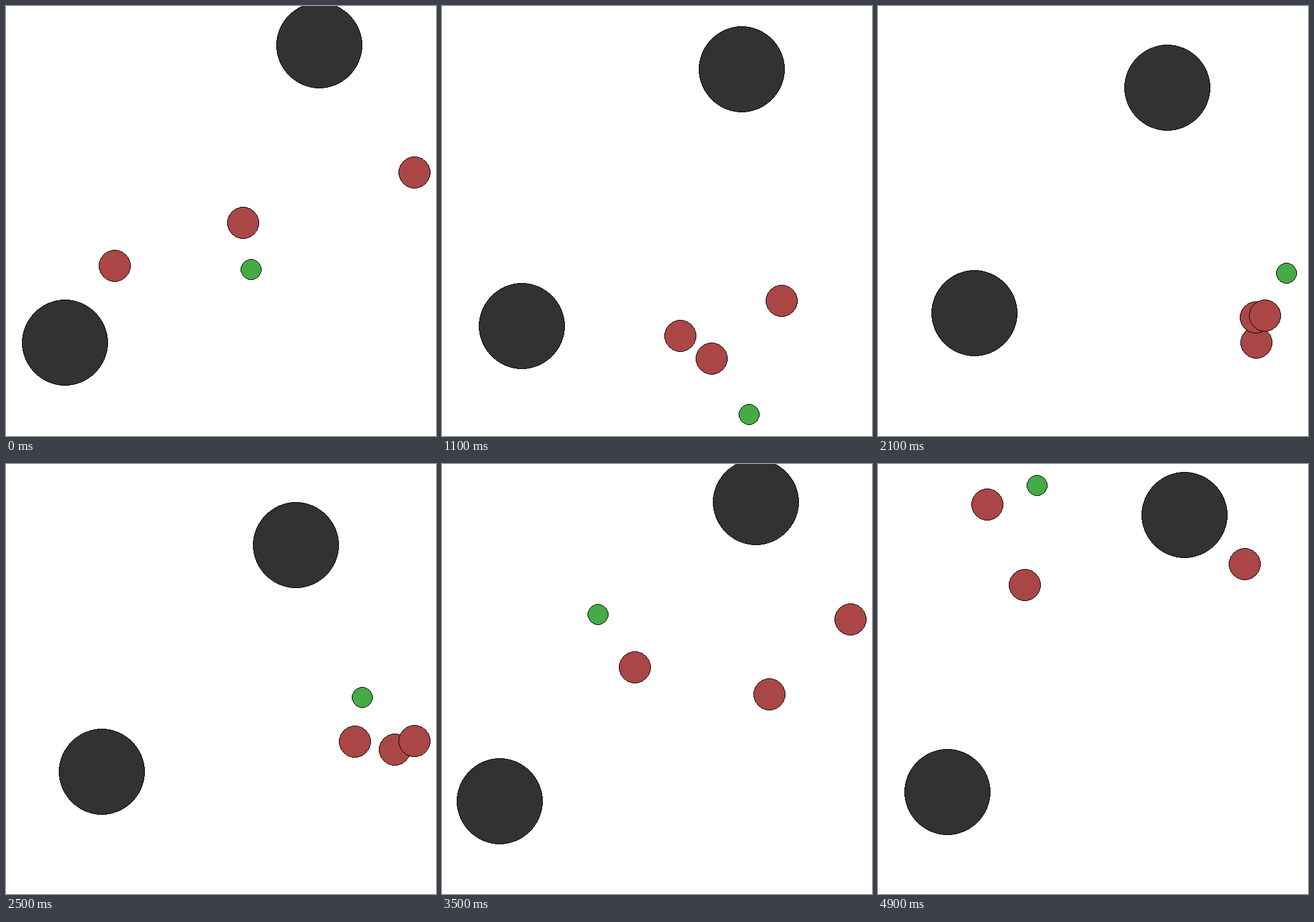
These frames come from a looping animation (700 px wide and 700 px high, 5 s). An HTML page with a canvas:

```html
<!DOCTYPE html>
<html>
<head>
<meta charset="utf-8">
<style>
html, body { margin: 0; width: 100%; height: 100%; overflow: hidden; background: #fff; }
canvas { display: block; }
</style>
</head>
<body>
<canvas id="stage" width="700" height="700"></canvas>
<script>
const ctx = document.getElementById('stage').getContext('2d');
const STEPS = 50, STEP_MS = 100, MID = 350, REACH = 315;

// Key steps shared by all paths; positions are in world units.
const KEYS = [0, 7, 12, 15, 21, 29, 42, 49];
const chaser = (x, y) => ({ r: 26, color: 'rgb(170,70,70)', x, y });
const runner = (x, y) => ({ r: 17, color: 'rgb(70,170,70)', x, y });
const rock = (x, y) => ({ r: 70, color: 'rgb(50,50,50)', x: KEYS.map(() => x), y: KEYS.map(() => y) });

// Later bodies lie on top.
const bodies = [
  chaser([40, 19, 139, 202, 388, 371, -30, -131], [4, 189, 304, 330, 289, 41, 23, -180]),
  chaser([-190, -100, 85, 180, 386, 173, -224, -203], [81, 197, 245, 246, 229, 51, -119, -335]),
  chaser([347, 259, 262, 272, 408, 465, 209, 292], [-87, 31, 198, 277, 225, 52, -239, -220]),
  runner([54, 61, 232, 364, 458, 151, -272, -107], [88, 283, 412, 371.8, 125, -11, -240, -372]),
  rock(176.7, -315),
  rock(-279.6, 218.4)
];

function slope(v, i) {
  const gap = j => KEYS[j + 1] - KEYS[j], rate = j => (v[j + 1] - v[j]) / gap(j);
  if (i === 0) return 0; // everything starts at rest
  if (i === KEYS.length - 1) return rate(i - 1);
  return (rate(i - 1) * gap(i) + rate(i) * gap(i - 1)) / (gap(i - 1) + gap(i));
}

// Cubic Hermite curve through the key values
function glide(v, step) {
  const i = Math.max(0, KEYS.findIndex(k => k >= step) - 1);
  const h = KEYS[i + 1] - KEYS[i], u = (step - KEYS[i]) / h, w = 1 - u;
  return v[i] * w * w * (1 + 2 * u) + v[i + 1] * u * u * (3 - 2 * u) +
    h * u * w * (slope(v, i) * w - slope(v, i + 1) * u);
}

// Hard-edged midpoint circle with a one-pixel black rim
function disc(cx, cy, r, color) {
  const spans = [];
  for (let x = 0, y = r, f = 1 - r; x < y;) {
    if (f >= 0) f -= 2 * --y;
    f += 2 * ++x + 1;
    for (const [a, b] of [[x, y], [y, x]]) spans.push([a, cy - b], [a, cy + b - 1]);
  }
  ctx.fillStyle = color;
  for (const [a, row] of spans) ctx.fillRect(cx - a, row, 2 * a, 1);
  ctx.fillStyle = '#000';
  for (const [a, row] of spans) {
    ctx.fillRect(cx - a, row, 1, 1);
    ctx.fillRect(cx + a - 1, row, 1, 1);
  }
}

function draw(step) {
  const spots = bodies.map(b => [glide(b.x, step), glide(b.y, step)]);
  // The camera zooms so that the farthest body stays in view
  const zoom = REACH / Math.max(...spots.flat().map(Math.abs));
  ctx.fillStyle = '#fff';
  ctx.fillRect(0, 0, 700, 700);
  bodies.forEach((b, i) => {
    const [x, y] = spots[i].map(p => Math.floor(MID + p * zoom + 1e-6));
    disc(x, y, b.r, b.color);
  });
}

const start = performance.now();
function tick() {
  draw(Math.floor((performance.now() - start) / STEP_MS) % STEPS);
  requestAnimationFrame(tick);
}
tick();
</script>
</body>
</html>
```
